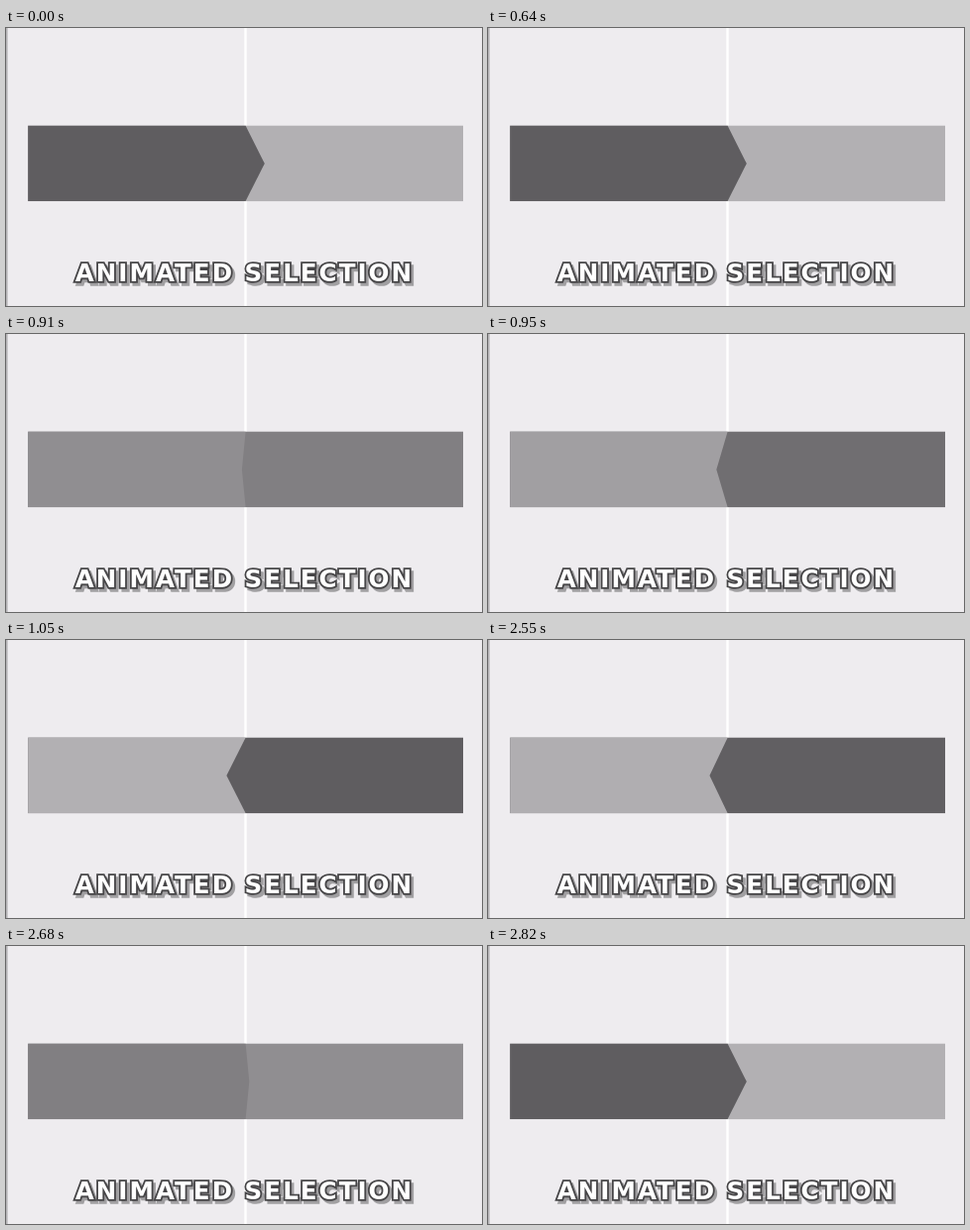
These frames come from a looping animation (480x281 px, 3870 ms). An HTML page:

```html
<!DOCTYPE html>
<html lang="en">
<head>
<meta charset="utf-8">
<title>Animated selection</title>
<style>
  html, body { margin: 0; width: 100%; height: 100%; overflow: hidden; background: #eeecef; }
  svg { display: block; width: 100%; height: 100%; }
  text { font: 700 24.6px "DejaVu Sans", sans-serif; letter-spacing: 2px; text-anchor: middle;
         stroke-width: 3.6; stroke-linejoin: miter; stroke-miterlimit: 3; paint-order: stroke; }
  .shadow { fill: #a09fa1; stroke: #a09fa1; }
  .label { fill: #fff; stroke: #464547; }
</style>
</head>
<body>
<svg viewBox="0 0 480 281">
  <rect width="1.6" height="281" fill="#b3b1b4"/>
  <rect x="240.3" width="2.4" height="281" fill="#fff"/>
  <rect id="right" x="22.2" y="98.7" width="438.8" height="76.4"/>
  <path id="left"/>
  <text class="shadow" x="243" y="258.5">ANIMATED SELECTION</text>
  <text class="label" x="240.4" y="255.8">ANIMATED SELECTION</text>
</svg>
<script>
  const LOOP = 3870, DURATION = 280;
  const DARK = [95, 93, 96], LIGHT = [178, 176, 179];
  const left = document.getElementById('left');
  const right = document.getElementById('right');

  // Each switch is shown in short held steps.
  const toRight = { start: 752, steps: [770, 810, 860, 910, 950, 1000, 1050] };
  const toLeft = { start: 2522, steps: [2550, 2590, 2640, 2680, 2730, 2770, 2820] };

  const mix = (a, b, p) => a + (b - a) * p;
  const shade = p => `rgb(${DARK.map((c, i) => Math.round(mix(c, LIGHT[i], p)))})`;

  function progress(time, { start, steps }) {
    const held = steps.filter(step => step <= time).pop() ?? start;
    const t = Math.min(1, (held - start) / DURATION);
    return t * t * (3 - 2 * t);
  }

  function draw(now) {
    const time = now % LOOP;
    const p = progress(time, toRight) - progress(time, toLeft);
    const tip = mix(260.8, 222.4, p);
    left.setAttribute('d', `M22.2 98.7H241.6L${tip} 136.9L241.6 175.1H22.2Z`);
    left.setAttribute('fill', shade(p));
    right.setAttribute('fill', shade(1 - p));
    requestAnimationFrame(draw);
  }

  draw(0);
</script>
</body>
</html>
```
